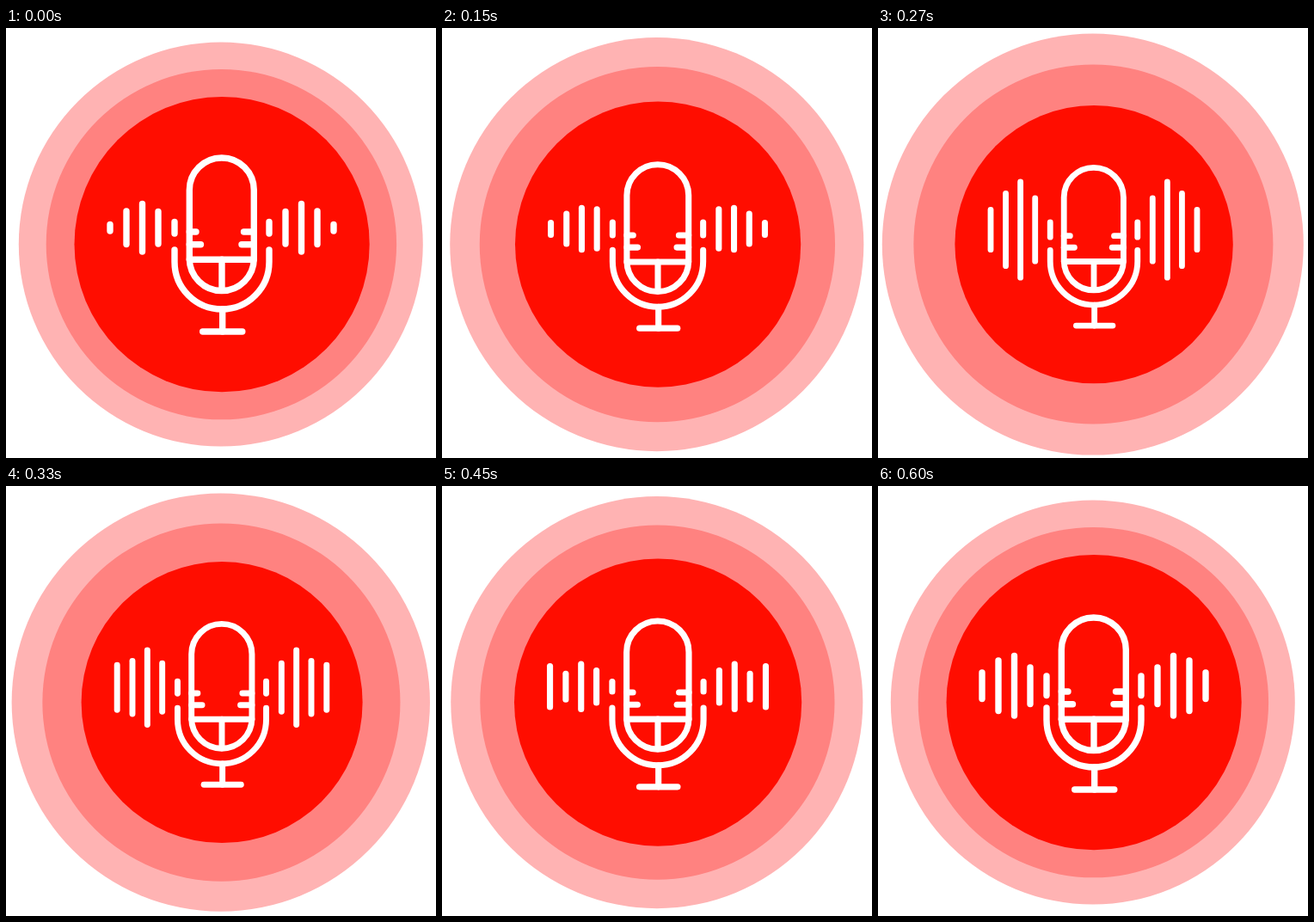
Recreate the animation shown at these times as an HTML page with a canvas. Size 500 by 500 pixels, loop 0.63 s.

```html
<!DOCTYPE html>
<html lang="en">
<head>
<meta charset="utf-8">
<title>Microphone pulse</title>
<style>
  html, body { margin: 0; width: 100%; height: 100%; overflow: hidden; background: #fff; }
  canvas { display: block; width: 500px; height: 500px; }
</style>
</head>
<body>
<canvas id="stage" width="500" height="500"></canvas>
<script>
const ctx = document.getElementById('stage').getContext('2d');
const STEP = 30, STEPS = 21, PEAK = 9, LAST = 20;
const PIVOT = { x: 251, y: 263 };

// Pose steps, then bar lengths (inner to outer) and capsule bob at each.
const POSES = [0, 3, 7, 9, 13, 17, 20];
const BARS = [
  { dx: 55, lengths: [21, 17, 27, 24, 18, 19, 30] },
  { dx: 74, lengths: [45, 31, 74, 80, 46, 43, 50] },
  { dx: 92.5, lengths: [63, 39, 72, 118, 69, 50, 77] },
  { dx: 111, lengths: [46, 51, 33, 91, 46, 28, 66] },
  { dx: 130, lengths: [15, 24, 18, 53, 65, 44, 38] }
];
const BOB = [0, 1.6, 4.2, 2.7, 2, 2.2, 2];

function sample(values, step) {
  let i = 0;
  while (i < POSES.length - 2 && step >= POSES[i + 1]) i++;
  const k = (step - POSES[i]) / (POSES[i + 1] - POSES[i]);
  return values[i] + (values[i + 1] - values[i]) * k;
}

function disc(x, radius, color) {
  ctx.fillStyle = color;
  ctx.beginPath();
  ctx.arc(x, 251.6, radius, 0, Math.PI * 2);
  ctx.fill();
}

function line(x1, y1, x2, y2) {
  ctx.beginPath();
  ctx.moveTo(x1, y1);
  ctx.lineTo(x2, y2);
  ctx.stroke();
}

function drawStand() {
  ctx.beginPath();
  ctx.moveTo(196, 258);
  ctx.lineTo(196, 272);
  ctx.arc(251, 272, 55, Math.PI, 0, true);
  ctx.lineTo(306, 258);
  ctx.stroke();
  line(251.7, 327, 251.7, 353);
  line(228.7, 353, 274.8, 353);
}

function drawCapsule() {
  ctx.beginPath();
  ctx.arc(250.8, 188.5, 37.5, Math.PI, 0);
  ctx.arc(250.8, 268, 37.5, 0, Math.PI);
  ctx.closePath();
  ctx.stroke();
  line(213.3, 269.3, 288.3, 269.3);
  line(251, 269.3, 251, 305);
  line(213.3, 237, 221, 237);
  line(213.3, 251.7, 226.5, 251.7);
  line(288.3, 237, 276.5, 237);
  line(288.3, 251.7, 274, 251.7);
}

function drawBars(step, scale) {
  for (const { dx, lengths } of BARS) {
    const half = sample(lengths, step) / scale / 2 - 3.7;
    for (const x of [PIVOT.x - dx, PIVOT.x + dx]) {
      line(x, 232.2 - half, x, 232.2 + half);
    }
  }
}

function draw(step) {
  const pulse = step < PEAK ? step / PEAK : (LAST - step) / (LAST - PEAK);
  const scale = 1 - 0.077 * pulse;

  ctx.fillStyle = '#fff';
  ctx.fillRect(0, 0, 500, 500);
  disc(249.8, 235 + 10 * pulse, '#ffb3b3');
  disc(250.4, 203.7 + 5.3 * pulse, '#ff8280');
  disc(251.1, 171.6 - 9.9 * pulse, '#ff0d00');

  ctx.save();
  ctx.translate(PIVOT.x, PIVOT.y);
  ctx.scale(scale, scale);
  ctx.translate(-PIVOT.x, -PIVOT.y);
  ctx.strokeStyle = '#fff';
  ctx.lineWidth = 7.4;
  ctx.lineCap = 'round';
  drawStand();
  drawBars(step, scale);
  ctx.translate(0, sample(BOB, step) / scale);
  drawCapsule();
  ctx.restore();
}

function tick() {
  draw(Math.floor(performance.now() / STEP) % STEPS);
  requestAnimationFrame(tick);
}
tick();
</script>
</body>
</html>
```
